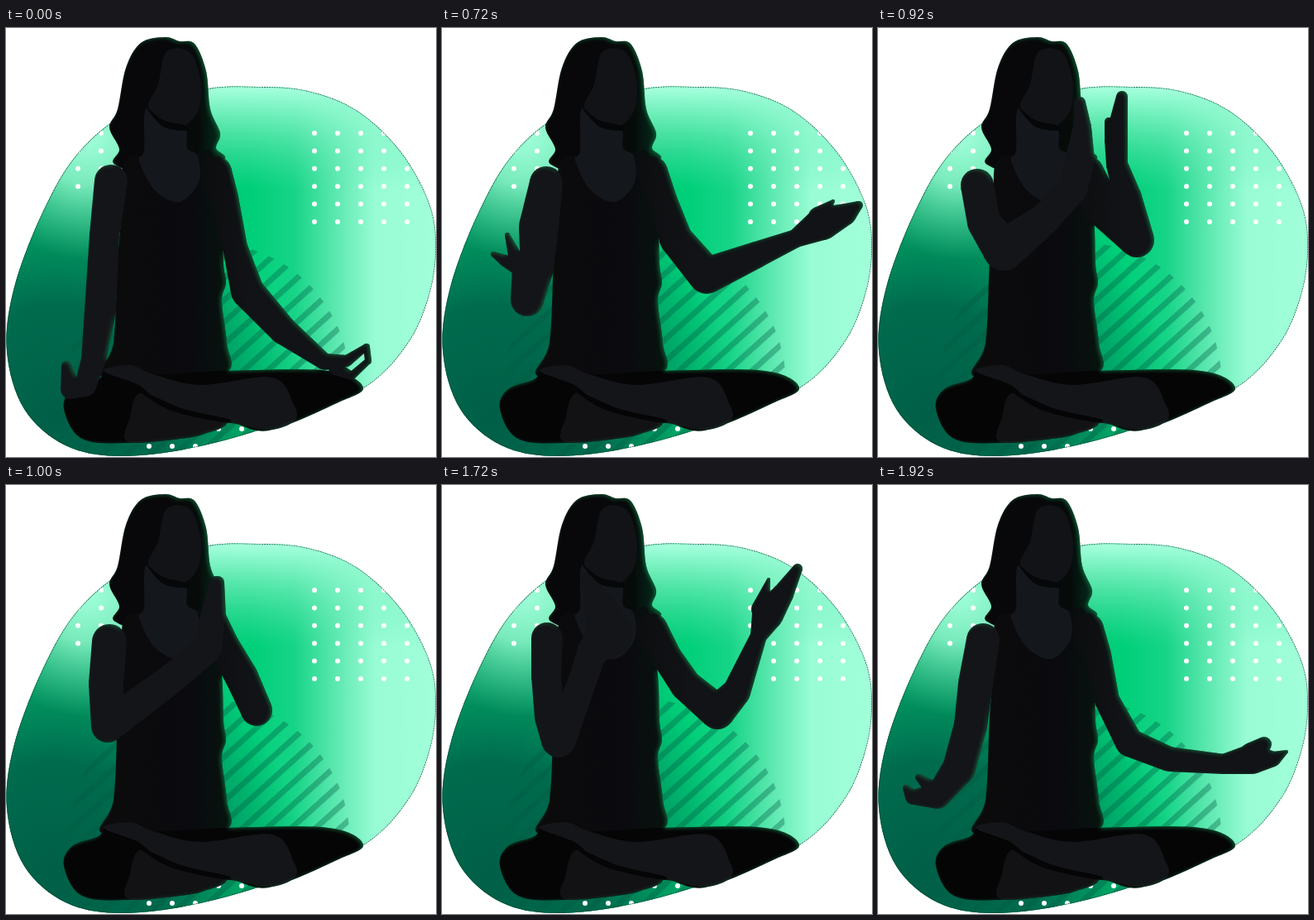
Write an HTML page that moves like this. It is 520 px wide and 518 px high and loops after 2000 ms.

```html
<!DOCTYPE html>
<html lang="en">
<head>
<meta charset="utf-8">
<title>Meditation</title>
<style>
  html, body { margin: 0; width: 100%; height: 100%; overflow: hidden; background: #fff; }
  svg { display: block; width: 520px; height: 518px; }
</style>
</head>
<body>
<svg viewBox="0 0 520 518">
  <defs>
    <linearGradient id="ground" gradientUnits="userSpaceOnUse" x1="130" y1="0" x2="520" y2="0">
      <stop offset="0" stop-color="#00b56e"/>
      <stop offset=".43" stop-color="#00cf79"/>
      <stop offset=".56" stop-color="#16d487"/>
      <stop offset=".69" stop-color="#5de8b0"/>
      <stop offset=".81" stop-color="#98fcd4"/>
      <stop offset="1" stop-color="#a1ffda"/>
    </linearGradient>
    <linearGradient id="sky" gradientUnits="userSpaceOnUse" x1="0" y1="75" x2="0" y2="195">
      <stop offset="0" stop-color="#a1ffda"/>
      <stop offset=".35" stop-color="#8ff8cd" stop-opacity=".62"/>
      <stop offset="1" stop-color="#5de8b0" stop-opacity="0"/>
    </linearGradient>
    <radialGradient id="shade" gradientUnits="userSpaceOnUse" cx="60" cy="470" r="300">
      <stop offset="0" stop-color="#005f47"/>
      <stop offset=".45" stop-color="#006149" stop-opacity=".88"/>
      <stop offset="1" stop-color="#00704f" stop-opacity="0"/>
    </radialGradient>
    <radialGradient id="mint" gradientUnits="userSpaceOnUse" cx="100" cy="130" r="150">
      <stop offset="0" stop-color="#a1ffda"/>
      <stop offset=".4" stop-color="#8cf3c8" stop-opacity=".85"/>
      <stop offset="1" stop-color="#5fd3a4" stop-opacity="0"/>
    </radialGradient>
    <linearGradient id="hair" gradientUnits="userSpaceOnUse" x1="195" y1="0" x2="258" y2="0">
      <stop offset="0" stop-color="#08080a"/>
      <stop offset=".6" stop-color="#060b09"/>
      <stop offset="1" stop-color="#032a1b"/>
    </linearGradient>
    <linearGradient id="top" gradientUnits="userSpaceOnUse" x1="135" y1="0" x2="268" y2="0">
      <stop offset="0" stop-color="#0b0b0c"/>
      <stop offset=".65" stop-color="#0a0a0f"/>
      <stop offset="1" stop-color="#07130e"/>
    </linearGradient>
    <linearGradient id="sleeve" gradientUnits="userSpaceOnUse" x1="235" y1="0" x2="300" y2="0">
      <stop offset="0" stop-color="#0b0d0f"/>
      <stop offset="1" stop-color="#111316"/>
    </linearGradient>
    <pattern id="stripes" patternUnits="userSpaceOnUse" y="456.5" width="100" height="19.7" patternTransform="rotate(-42)">
      <rect width="100" height="7" fill="#005c42" fill-opacity=".36"/>
    </pattern>
    <filter id="rim" filterUnits="userSpaceOnUse" x="0" y="0" width="520" height="518" color-interpolation-filters="sRGB">
      <feGaussianBlur in="SourceAlpha" stdDeviation="2.2"/>
      <feOffset dx="-2" dy="1.2" result="shift"/>
      <feComposite in="SourceAlpha" in2="shift" operator="out" result="edge"/>
      <feFlood flood-color="#128048" flood-opacity=".65"/>
      <feComposite in2="edge" operator="in" result="light"/>
      <feMerge><feMergeNode in="SourceGraphic"/><feMergeNode in="light"/></feMerge>
    </filter>
    <clipPath id="inBlob"></clipPath>
    <g id="body"></g>
  </defs>
  <g id="scene" clip-path="url(#inBlob)">
    <rect width="520" height="518" fill="url(#ground)"/>
    <rect width="520" height="518" fill="url(#sky)"/>
    <rect width="520" height="518" fill="url(#shade)"/>
    <rect width="520" height="518" fill="url(#mint)"/>
    <circle cx="245" cy="430" r="171" fill="url(#stripes)"/>
  </g>
  <g id="poses"></g>
</svg>
<script>
const SKIN = '#141519', DARK = '#050506';
const $ = id => document.getElementById(id);
const parse = text => text.trim().split(/\s+/).map(s => s.split(',').map(Number));

function add(parent, tag, attrs) {
  const el = document.createElementNS('http://www.w3.org/2000/svg', tag);
  for (const key in attrs) el.setAttribute(key, attrs[key]);
  return parent.appendChild(el);
}

// Closed smooth outline through a few key points
function outline(parent, text, fill, more) {
  const p = parse(text), n = p.length, at = i => p[(i + n) % n];
  let d = 'M' + p[0];
  for (let i = 0; i < n; i++) {
    const [a, b, c, e] = [at(i - 1), at(i), at(i + 1), at(i + 2)];
    d += `C${b.map((v, k) => v + (c[k] - a[k]) / 6)} ${c.map((v, k) => v - (e[k] - b[k]) / 6)} ${c}`;
  }
  return add(parent, 'path', { d: d + 'Z', fill, ...more });
}

// Tapered limb: round joints "x,y,radius" bridged by their outer tangents
function limb(parent, text, fill) {
  parse(text).forEach(([x, y, r], i, joints) => {
    add(parent, 'circle', { cx: x, cy: y, r, fill });
    if (!i) return;
    const [px, py, pr] = joints[i - 1];
    const dx = x - px, dy = y - py;
    const angle = Math.atan2(dy, dx);
    const spread = Math.acos(Math.max(-1, Math.min(1, (pr - r) / Math.hypot(dx, dy))));
    const touch = (cx, cy, cr, a) => [cx + cr * Math.cos(a), cy + cr * Math.sin(a)];
    const points = [
      touch(px, py, pr, angle + spread), touch(x, y, r, angle + spread),
      touch(x, y, r, angle - spread), touch(px, py, pr, angle - spread)
    ];
    add(parent, 'polygon', { points: points.join(' '), fill });
  });
}

function dots(x, y, cols, rows) {
  for (let i = 0; i < cols * rows; i++)
    add(scene, 'circle', { cx: x + i % cols * 28, cy: y + Math.floor(i / cols) * 21.4, r: 3, fill: '#fff' });
}

// Background
const scene = $('scene');
const blob = `240,74 305,71 365,76 425,100 478,150 512,212 520,265 512,322 486,381 434,434
  340,474 235,505 140,517 72,504 22,460 1,390 10,313 45,221 88,150 150,101`;
outline($('inBlob'), blob);
dots(373, 127, 5, 6);
dots(87, 127, 2, 4);
dots(257, 484, 2, 1);
dots(173, 505, 3, 1);
outline(scene, blob, 'none', { stroke: '#0b2b20', 'stroke-opacity': .75, 'stroke-width': 1.6, 'stroke-dasharray': '2 1' });

// Head, torso and legs
const body = $('body');
outline(body, `192,11 163,18 145,48 135,98 125,120 137,146 132,165 190,180 262,160 254,145
  259,127 247,98 242,52 228,19 210,16`, 'url(#hair)');
outline(body, '194,29 222,29 235,62 233,98 214,119 190,112 172,95 184,68', '#111317');
outline(body, `142,164 165,154 200,162 234,150 251,155 261,230 263,285 266,308 261,330 267,380
  266,416 180,424 115,420 130,380 135,280 140,220`, 'url(#top)');
outline(body, '169,97 190,119 217,122 219,145 232,155 233,186 210,210 180,196 161,160 167,148', '#14171c');
outline(body, '169,95 190,111 217,118 217,124 190,119', '#060708');
outline(body, `70,460 80,436 112,424 122,412 150,407 180,418 265,414 390,414 432,434 400,453
  318,486 270,477 230,493 150,501 92,496`, DARK);
outline(body, `118,414 150,407 178,418 235,431 322,422 348,455 349,474 318,485 268,475
  190,452 160,431`, SKIN);
outline(body, '162,441 200,459 266,476 230,492 149,500 150,470', '#121215');
outline(body, '163,440 175,443 215,460 268,472 262,476 200,462', DARK);

// Arm joints from hands on the knees to palms joined
const poses = [
  { left: ['127,185,20 119,250,18 114,340,19 106,400,15 96,432,13 78,436,12 73,408,6'],
    right: ['254,174,19 264,205,17 277,265,15 292,318,20 335,365,17 385,403,10 412,402,7 436,385,4 438,402,4 418,420,5 398,411,8'] },
  { left: ['127,187,20 118,240,21 112,290,20 98,342,20 72,376,15 42,377,9 34,366,4', '72,372,12 49,353,4'],
    right: ['254,174,19 266,205,16 277,260,15 304,311,17 352,331,15 418,337,12 452,331,18 478,331,9 494,322,2', '452,327,16 467,313,9'] },
  { left: ['126,187,20 117,240,24 115,290,20 103,328,20 96,290,11 76,281,7 62,273,3', '88,275,8 79,250,3'],
    right: ['254,174,19 268,210,17 283,255,20 320,299,22 380,274,16 428,254,11 460,236,20 488,225,13 504,214,5', '455,228,12 473,209,2'] },
  { left: ['127,185,19 126,230,18 130,280,18 141,308,21 167,245,17 182,200,18 203,180,27 193,150,20 174,112,6'],
    right: ['254,174,19 272,208,18 295,242,19 333,274,21 356,250,17 383,182,10 394,156,19 412,132,13 430,101,6', '385,150,11 395,114,2'] },
  { left: ['120,190,20 128,235,20 152,268,25 200,232,19 236,195,17 244,160,18 247,120,11 244,90,7'],
    right: ['254,174,19 270,215,23 313,256,21 302,205,17 289,165,13 288,135,14 295,83,7', '285,130,11 279,113,5'] },
  { left: ['125,189,21 121,240,21 123,291,20 200,234,18 244,198,17 250,160,15 254,118,8'],
    right: ['303,272,19 285,232,20 263,194,19 251,160,15 256,118,8'] }
];

const groups = poses.map(({ left, right }) => {
  const g = add($('poses'), 'g', { filter: 'url(#rim)' });
  add(g, 'use', { href: '#body' });
  right.forEach(chain => limb(g, chain, 'url(#sleeve)'));
  left.forEach(chain => limb(g, chain, SKIN));
  return g;
});

// The hands rise through the poses and return the same way
const LOOP = 2000;
const starts = [0, 600, 720, 800, 920, 1000, 1600, 1720, 1800, 1920, LOOP];
const poseAt = step => 5 - Math.abs(5 - step);
groups.forEach((g, i) => g.animate(
  starts.map((ms, step) => ({ offset: ms / LOOP, opacity: +(poseAt(step) === i), easing: 'step-end' })),
  { duration: LOOP, iterations: Infinity }
));
</script>
</body>
</html>
```
